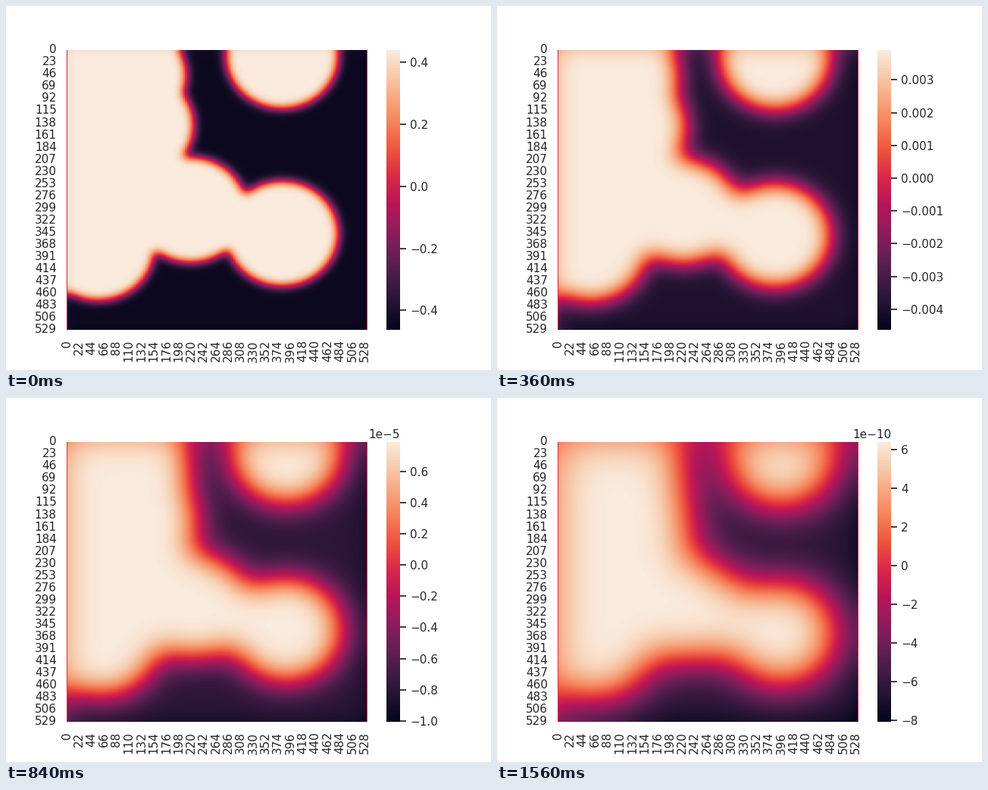
Recreate the animation shown at these times as a matplotlib script. Size 640 px wide and 480 px high, loop 1.6 s.

```python
import numpy as np
import matplotlib.pyplot as plt
from matplotlib.animation import FuncAnimation
from matplotlib.colors import LinearSegmentedColormap

FRAMES, INTERVAL = 40, 40
N = 531                       # grid cells per side
DIFFUSION, DRIFT = 17, 0.38   # cells^2 and cells per frame
INFLOW, OUTFLOW = 0.4, 0.73   # share of the drift that passes each wall
LEAD_TIME = 2.2               # time elapsed before the first frame
RADIUS = 100
CENTERS = [(380, 12), (380, 348), (218, 303), (54, 375), (54, 104),
           (54, 271), (124, 143), (111, 49), (40, 18)]

# Decay of the colour limits, interpolated on a log scale
KNOTS = [0, 2, 9, 14, 21, 28, 39]
HIGH = [0.44, 0.1476, 3.92e-3, 2.958e-4, 7.917e-6, 2.124e-7, 6.40e-10]
LOW = [0.463, 0.1617, 4.634e-3, 3.612e-4, 1.007e-5, 2.74e-7, 8.08e-10]

ROCKET = LinearSegmentedColormap.from_list("rocket", [
    "#03051a", "#221331", "#451c47", "#6a1f56", "#921c5b", "#b91657",
    "#d92847", "#ed503e", "#f47d57", "#f6a47c", "#f7c9aa", "#faebdd"])

plt.rcParams.update({
    "font.family": "DejaVu Sans",
    "text.color": ".15",
    "xtick.color": ".15", "ytick.color": ".15",
    "xtick.labelsize": 11, "ytick.labelsize": 11,
    "xtick.major.size": 6, "ytick.major.size": 6,
    "xtick.major.width": 1.25, "ytick.major.width": 1.25,
    "xtick.bottom": False, "ytick.left": False,
})


def transport(time, doublings=10):
    """Matrix that drifts and diffuses one axis between two walls."""
    flux = np.zeros((N + 1, N))
    face = np.arange(1, N)
    flux[face, face - 1] = DRIFT / 2 + DIFFUSION
    flux[face, face] = DRIFT / 2 - DIFFUSION
    flux[0, 0] = INFLOW * DRIFT
    flux[N, N - 1] = OUTFLOW * DRIFT
    rate = flux[:-1] - flux[1:]
    step = np.eye(N) + rate * time / 2 ** doublings
    for _ in range(doublings):
        step = step @ step
    return step


def initial_field():
    y, x = np.mgrid[:N, :N] + 0.5
    inside = np.zeros((N, N), bool)
    for cx, cy in CENTERS:
        inside |= np.hypot(x - cx, y - cy) < RADIUS
    return np.where(inside, 1.0, -1.0)


def limit(values, frame):
    return np.exp(np.interp(frame, KNOTS, np.log(values)))


def evolve():
    lead, step = transport(LEAD_TIME), transport(1)
    field = lead @ initial_field() @ lead.T
    fields = []
    for frame in range(FRAMES):
        scaled = field / field.max() * limit(HIGH, frame)
        fields.append(np.pad(scaled, ((0, 0), (1, 1))))  # zero side columns
        field = step @ field @ step.T
    return fields


fields = evolve()
rows, cols = fields[0].shape

fig, ax = plt.subplots(figsize=(6.4, 4.8), dpi=100)
image = ax.imshow(fields[0], cmap=ROCKET, aspect="auto",
                  interpolation="nearest", extent=(0, cols, rows, 0),
                  vmin=-limit(LOW, 0), vmax=limit(HIGH, 0))
ax.spines[:].set_visible(False)
x_ticks, y_ticks = np.arange(0, cols, 22), np.arange(0, rows, 23)
ax.set_xticks(x_ticks + 0.5, x_ticks, rotation=90)
ax.set_yticks(y_ticks + 0.5, y_ticks, va="center")
bar = fig.colorbar(image, ax=ax)
bar.outline.set_linewidth(0)


def update(frame):
    image.set_data(fields[frame])
    image.set_clim(-limit(LOW, frame), limit(HIGH, frame))
    return [image]


anim = FuncAnimation(fig, update, frames=FRAMES, interval=INTERVAL,
                     repeat=True, repeat_delay=0, blit=False)
plt.show()
```
